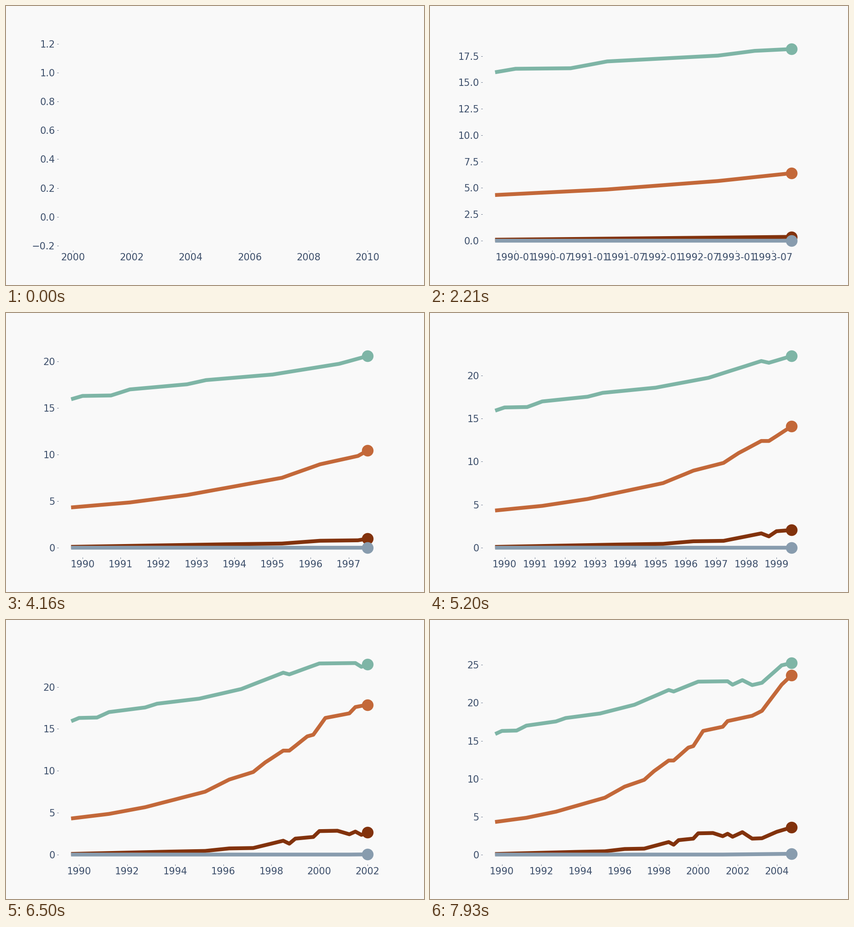
A matplotlib script that plays this animation: 917x611 px, repeating every 8 s.

```python
import matplotlib.pyplot as plt
import matplotlib.dates as mdates
import numpy as np
from matplotlib.animation import FuncAnimation

W, H, DPI = 917, 611, 64
PX = 72 / DPI  # points per pixel
PAPER, INK = "#f9f9f9", "#3d4f6b"
FRAMES, LOOP_MS = 62, 8000

quarter = np.arange(FRAMES - 1)
months = np.datetime64("1989-10") + 3 * quarter
dates = mdates.date2num(months.astype("datetime64[D]"))


def trend(*turns):
    """Straight runs between (quarter, value) turning points."""
    return np.interp(quarter, *zip(*turns))


teal = trend((0, 16), (1, 16.3), (4, 16.35), (6, 17), (12, 17.55), (14, 18),
             (21, 18.6), (28, 19.75), (35, 21.7), (36, 21.5), (41, 22.8),
             (47, 22.85), (48, 22.4), (50, 23), (52, 22.35), (54, 22.65),
             (58, 24.95), (60, 25.25))
orange = trend((0, 4.33), (6, 4.85), (12, 5.65), (22, 7.5), (26, 8.95),
               (30, 9.85), (32, 11), (35, 12.4), (36, 12.4), (39, 14.1),
               (40, 14.3), (42, 16.3), (46, 16.85), (47, 17.6), (52, 18.3),
               (54, 18.95), (58, 22.4), (60, 23.63))
brown = trend((0, 0.08), (16, 0.35), (22, 0.43), (26, 0.73), (30, 0.78),
              (35, 1.65), (36, 1.3), (37, 1.9), (40, 2.1), (41, 2.8),
              (44, 2.84), (46, 2.42), (47, 2.74), (48, 2.35), (50, 2.95),
              (52, 2.1), (54, 2.15), (57, 3), (60, 3.58))
slate = trend((46, 0), (60, 0.1))

series = [(teal, "#7eb5a6"), (orange, "#c36839"),
          (brown, "#82320c"), (slate, "#889cae")]

fig = plt.figure(figsize=(W / DPI, H / DPI), dpi=DPI, facecolor=PAPER)
ax = fig.add_axes([0.125, 0.125, 0.775, 0.755], facecolor=PAPER)
ax.xaxis_date()
ax.spines[:].set_visible(False)
ax.tick_params(colors=INK, labelsize=20.83 * PX, length=3.4 * PX,
               width=0.83 * PX, pad=3.4 * PX)

lines = [
    ax.plot([], [], color=color, lw=8.33 * PX, marker="o", ms=25.5 * PX,
            mew=0, markevery=[-1])[0]
    for _, color in series
]


def padded(lo, hi, margin=0.05):
    pad = (hi - lo) * margin
    return lo - pad, hi + pad


def update(n):
    for line, (values, _) in zip(lines, series):
        line.set_data(dates[:n], values[:n])
        line.set_visible(n > 0)
    if n == 0:
        decade = mdates.date2num(np.array(["2000-01-01", "2010-01-01"],
                                          dtype="datetime64[D]"))
        ax.set_xlim(*padded(*decade))
        ax.set_ylim(0.5 - 0.732, 0.5 + 0.732)
    else:
        ax.relim()
        ax.autoscale(True)
    return lines


anim = FuncAnimation(fig, update, frames=FRAMES, interval=LOOP_MS / FRAMES,
                     repeat=True, repeat_delay=0, blit=False)
plt.show()
```
